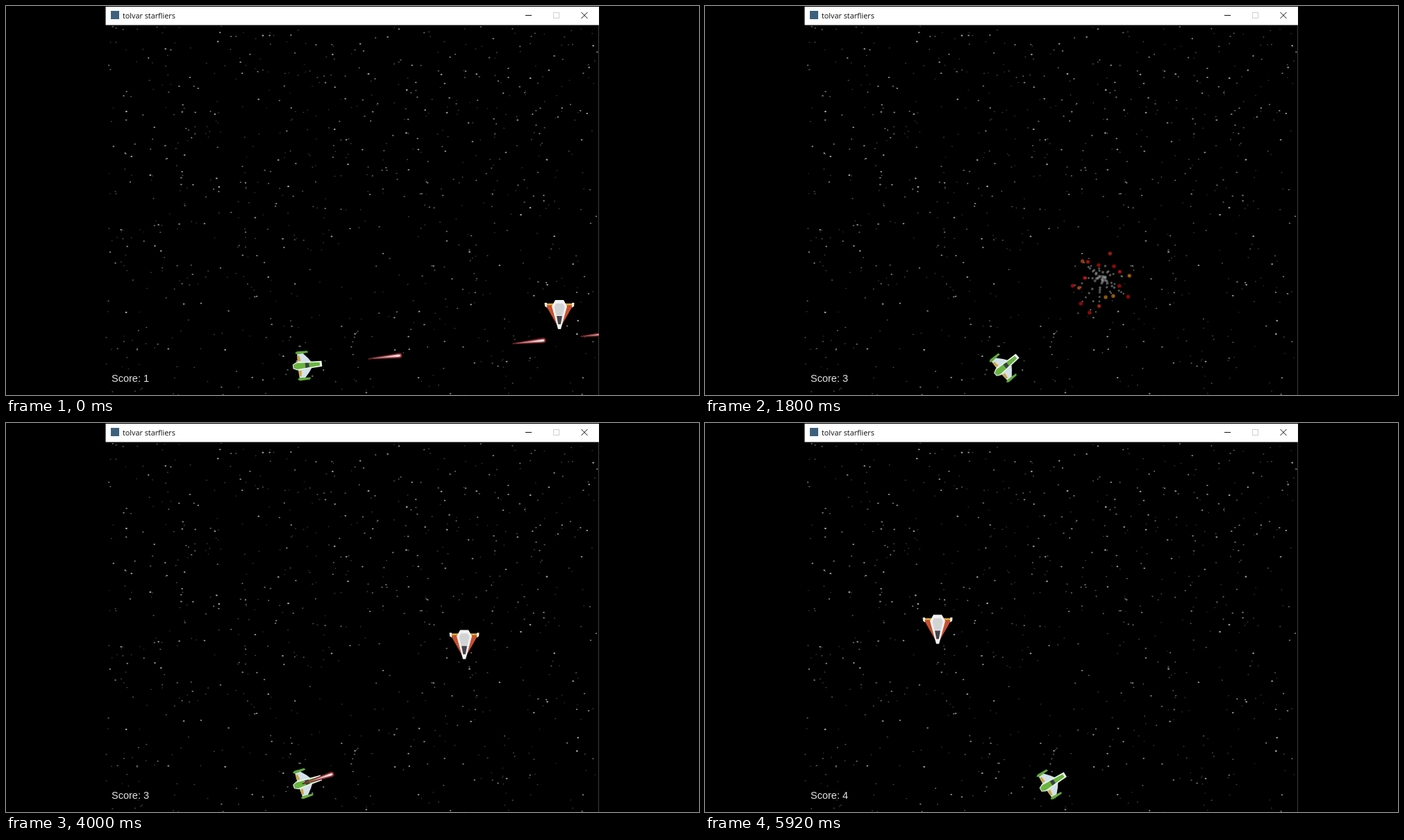
Animation, 998 px wide and 561 px high, one loop 5960 ms. Source, as an HTML page with a canvas:

```html
<!DOCTYPE html>
<html lang="en">
<head>
<meta charset="utf-8">
<title>tolvar starfliers</title>
<style>
  html, body { margin: 0; width: 100%; height: 100%; overflow: hidden; background: #000; }
  canvas { position: absolute; left: 0; top: 0; display: block; }
  .label { position: absolute; white-space: pre; line-height: 20px; }
  #title { left: 168px; top: 4px; font-size: 10.8px; color: #111; font-family: "Open Sans", "Noto Sans", sans-serif; }
  #score { left: 152px; top: 527px; font-size: 14.5px; color: #e2e2e2; font-family: "Liberation Sans", Arial, sans-serif; }
</style>
</head>
<body>
<canvas id="stage" width="998" height="561"></canvas>
<div class="label" id="title">tolvar starfliers</div>
<div class="label" id="score">Score: 1</div>
<script>
const W = 998, H = 561, LOOP = 5960, STEP = 40;
const LEFT = 143, RIGHT = 854, BAR = 27;
const TICK = 1000 / 60, TAU = Math.PI * 2;
const ENEMY_SPEED = 0.346, SHOT_SPEED = 0.62;
const RAYS = 17, SPARK_LIFE = 32, SMOKE_LIFE = 42, SMOKE_RISE = 0.44;
const HOME = { x: 434, y: 518 };

const ctx = document.getElementById("stage").getContext("2d");
const scoreLabel = document.getElementById("score");

function rng(seed) {
  return () => {
    seed = (seed + 0x6D2B79F5) | 0;
    let v = Math.imul(seed ^ (seed >>> 15), 1 | seed);
    v = (v + Math.imul(v ^ (v >>> 7), 61 | v)) ^ v;
    return ((v ^ (v >>> 14)) >>> 0) / 4294967296;
  };
}

function poly(c, color, ...pts) {
  c.fillStyle = color;
  c.beginPath();
  for (let i = 0; i < pts.length; i += 2) c.lineTo(pts[i], pts[i + 1]);
  c.fill();
}

function dot(c, x, y, r, fill) {
  c.fillStyle = fill;
  c.beginPath();
  c.arc(x, y, r, 0, TAU);
  c.fill();
}

// eases from one value to the next between two times
function ease(t, from, to, start, end) {
  const f = Math.min(1, Math.max(0, (t - start) / (end - start)));
  return from + (to - from) * f * f * (3 - 2 * f);
}

function makeBackdrop() {
  const cv = document.createElement("canvas");
  cv.width = W;
  cv.height = H;
  const c = cv.getContext("2d");
  c.fillStyle = "#000";
  c.fillRect(0, 0, W, H);

  const rand = rng(41);
  for (let i = 0; i < 850; i++) {
    const x = LEFT + 1 + rand() * (RIGHT - LEFT - 3);
    const y = BAR + 2 + (H - BAR) * rand() ** 1.1;
    const glow = rand() ** 2;
    c.fillStyle = `rgba(205,208,205,${0.25 + 0.55 * glow})`;
    c.beginPath();
    c.ellipse(x, y, 0.9 + glow * 0.6, 0.7 + glow * 0.4, 0, 0, TAU);
    c.fill();
  }

  c.fillStyle = "#3a3a3a";
  c.fillRect(RIGHT - 1, BAR, 1, H - BAR);
  c.fillStyle = "#fff";
  c.fillRect(LEFT + 0.5, 1, RIGHT - LEFT - 0.5, BAR - 0.5);
  c.fillStyle = "#3d607c";
  c.fillRect(151, 7, 12, 12);

  c.fillStyle = "#111";
  c.fillRect(748, 13, 9, 1);
  c.strokeStyle = "#cfcfcf";
  c.strokeRect(788.5, 9.5, 8, 8);
  c.strokeStyle = "#111";
  c.beginPath();
  c.moveTo(828.5, 9); c.lineTo(837.5, 18);
  c.moveTo(837.5, 9); c.lineTo(828.5, 18);
  c.stroke();
  return cv;
}
const backdrop = makeBackdrop();

// each enemy is at height y at the time "at" and is hit at "end"
const enemies = [
  { x: 797, y: 445, at: 0, end: 80 },
  { x: 569.5, y: 246, at: 1160, end: 1600 },
  { x: 660, y: 139.5, at: 3480, end: 4320 },
  { x: 335, y: 297.5, at: 5920, end: LOOP }
];
const enemyY = (e, t) => e.y + (t - e.at) * ENEMY_SPEED;

const shots = [
  { fire: -677, end: LOOP },
  { fire: -518, end: 80 },
  { fire: -182, end: LOOP },
  { fire: 1360, end: 1600 },
  { fire: 3974, end: 4320 }
];

function aim(t) {
  if (t < 2440) return ease(t, -6, -40, 200, 1000);
  if (t < 3520) return ease(t, -40, -102, 2600, 3440);
  if (t < 5000) return ease(t, -102, -18, 3540, 3920);
  return ease(t, -18, -32, 5300, 5900);
}

function drawPlayer(x, y, deg) {
  ctx.save();
  ctx.translate(x, y);
  ctx.rotate(deg * Math.PI / 180);
  for (const s of [1, -1]) {
    poly(ctx, "#d3e1e8", -14, 0, -13, 18 * s, -5, 18 * s, 2, 10 * s, 7, 3 * s, 7, 0);
    poly(ctx, "#cfa83a", -13, 7 * s, -13, 15 * s, -10, 15 * s, -9, 7 * s);
    poly(ctx, "#62ad3c", -16, 19 * s, -13, 17 * s, 3, 18 * s, 2, 20.7 * s, -13, 21.2 * s);
  }
  poly(ctx, "#eef4f2", -21, -3, -15, -6, 0, -5, 21, -4, 21, 4, 0, 5, -15, 6, -21, 3);
  poly(ctx, "#69b53e", -20, -2.5, -15, -4.5, 0, -3.5, 18, -2.3, 18, 2.3, 0, 3.5, -15, 4.5, -20, 2.5);
  poly(ctx, "#3b4046", -3, -3.6, 2.5, -3, 2.5, 3, -3, 3.6);
  ctx.restore();
}

function drawEnemy(x, y) {
  ctx.save();
  ctx.translate(x, y);
  for (const s of [1, -1]) {
    poly(ctx, "#c7512f", 7 * s, -14, 20 * s, -14, 3 * s, 16, 2 * s, 0);
    poly(ctx, "#d9b23a", 6 * s, -16, 19 * s, -16, 19 * s, -13.5, 6 * s, -13.5);
    poly(ctx, "#ece9e4", 18 * s, -17, 21.5 * s, -17, 21 * s, -12, 18 * s, -10);
  }
  poly(ctx, "#f2f2f2", -6, -21, 6, -21, 11, -12, 8, -1, 2, 21, -2, 21, -8, -1, -11, -12);
  poly(ctx, "#d2d3d5", -5, -16, 5, -16, 7.5, -11, 4.5, 1, -4.5, 1, -7.5, -11);
  poly(ctx, "#45414c", -4, 2, 4, 2, 1.8, 14, -1.8, 14);
  ctx.restore();
}

// a tapered streak with its round end at the right
function streak(tail, head, half, dim, lit) {
  const g = ctx.createLinearGradient(tail, 0, head, 0);
  g.addColorStop(0, dim);
  g.addColorStop(1, lit);
  poly(ctx, g, tail, -half / 5, head - 3, -half, head, -half * 0.6, head, half * 0.6, head - 3, half, tail, half / 5);
}

function drawShot(s, t) {
  ctx.save();
  ctx.translate(HOME.x, HOME.y);
  ctx.rotate(aim(s.fire) * Math.PI / 180);
  ctx.translate((t - s.fire) * SHOT_SPEED, 0);
  streak(-24, 24, 3.9, "#6d2328", "#86282f");
  streak(-18, 22, 1.7, "#a84c50", "#fff0ee");
  ctx.restore();
}

function puff(x, y, age) {
  const r = 1.6 + 0.12 * age;
  const a = 0.42 * (1 - (age / SMOKE_LIFE) ** 2);
  const g = ctx.createRadialGradient(x, y, r * 0.45, x, y, r);
  g.addColorStop(0, `rgba(211,211,211,${a})`);
  g.addColorStop(1, "rgba(211,211,211,0)");
  dot(ctx, x, y, r, g);
}

// sparks fly out in straight rays and leave rising smoke behind
function drawBlast(e, t) {
  const n = (t - e.end) / TICK;
  if (n < 0 || n > SPARK_LIFE + SMOKE_LIFE) return;
  const y0 = enemyY(e, e.end), rand = rng(e.x);
  for (let i = 0; i < RAYS; i++) {
    const angle = (i + rand()) / RAYS * TAU;
    const reach = 60 + 70 * rand(), chance = 0.15 + 0.4 * rand();
    const at = k => [e.x + Math.cos(angle) * reach * k / SPARK_LIFE, y0 + Math.sin(angle) * reach * k / SPARK_LIFE];
    for (let k = 1; k <= SPARK_LIFE; k++) {
      const smokes = rand() < chance, age = n - k;
      if (!smokes || age < 0 || age >= SMOKE_LIFE) continue;
      const [x, y] = at(k);
      puff(x, y - SMOKE_RISE * age, age);
    }
    const hue = 40 * rand() ** 3;
    if (n < SPARK_LIFE) dot(ctx, ...at(n), 2.7, `hsla(${hue},90%,47%,${1 - n / SPARK_LIFE})`);
  }
}

function draw(t) {
  ctx.drawImage(backdrop, 0, 0);
  ctx.save();
  ctx.beginPath();
  ctx.rect(LEFT, BAR + 0.5, RIGHT - LEFT, H - BAR);
  ctx.clip();
  for (const e of enemies) {
    const y = enemyY(e, t);
    if (t >= e.end) drawBlast(e, t);
    else if (y > 0) drawEnemy(e.x, y);
  }
  drawPlayer(ease(t, HOME.x, 501, 5640, 5920), HOME.y, aim(t));
  for (const s of shots) if (t >= s.fire && t < s.end) drawShot(s, t);
  ctx.restore();
  scoreLabel.textContent = "Score: " + (1 + enemies.filter(e => t >= e.end).length);
}

const start = performance.now();
function frame() {
  const ms = Math.max(0, performance.now() - start) % LOOP;
  draw(ms < 80 ? 0 : Math.floor(ms / STEP) * STEP);
  requestAnimationFrame(frame);
}
frame();
</script>
</body>
</html>
```
